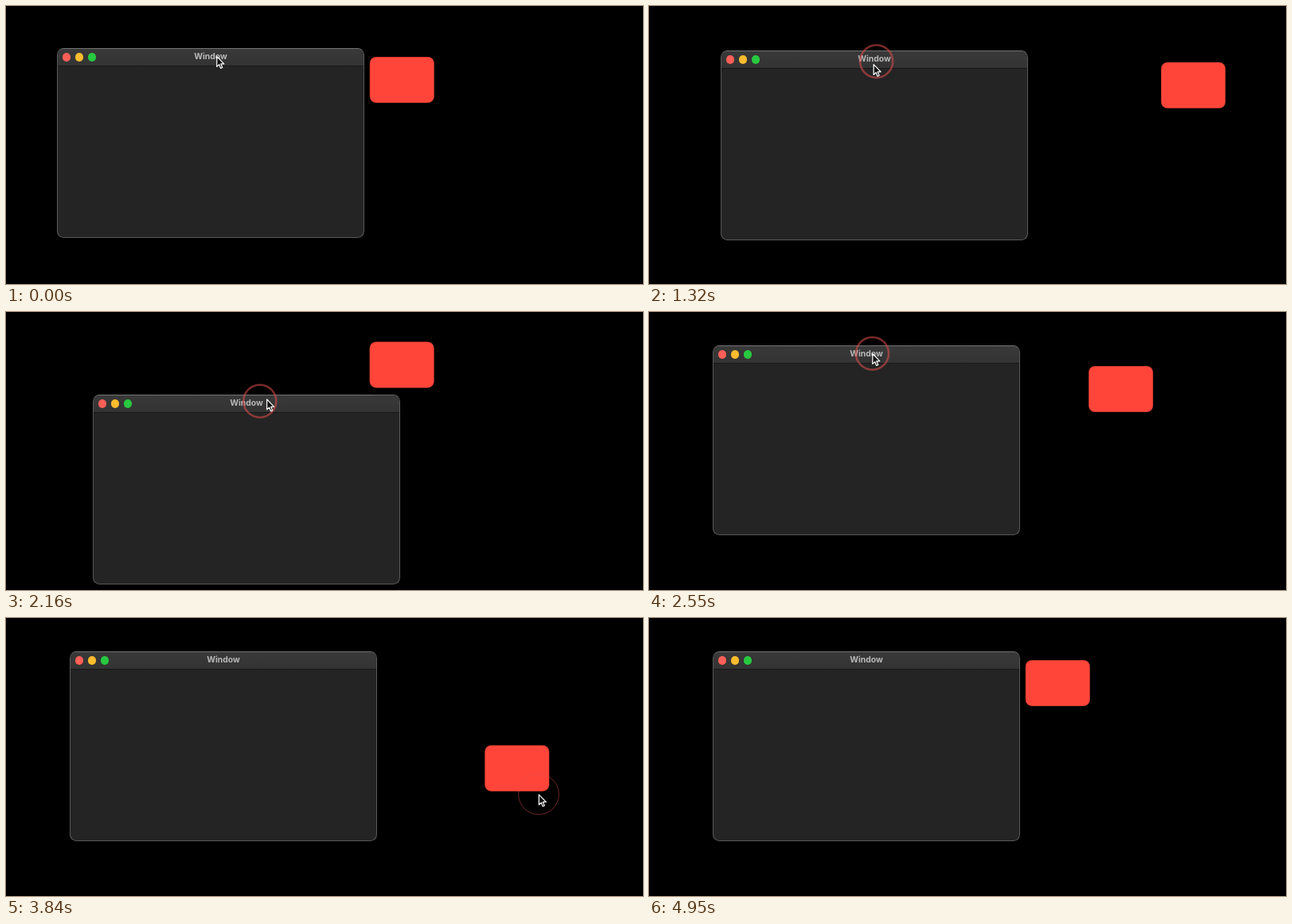
Recreate the animation shown at these times as an HTML page. Size 800 px wide and 350 px high, loop 5.04 s.

```html
<!DOCTYPE html>
<html lang="en">
<head>
<meta charset="utf-8">
<title>Attached panel</title>
<style>
  html, body { margin: 0; width: 100%; height: 100%; overflow: hidden; background: #000; }
  #stage { position: relative; width: 800px; height: 350px; overflow: hidden; background: #000; }
  #stage > * { position: absolute; left: 0; top: 0; }
  #win {
    box-sizing: border-box; width: 386px; height: 239px; overflow: hidden;
    border: 1px solid #585858; border-top-color: #727272; border-radius: 8.5px; background: #242424;
  }
  #bar {
    height: 21px; border-bottom: 1px solid #181818;
    background: linear-gradient(#393939, #333);
    font: 700 10.4px/20.5px Inter, "Open Sans", sans-serif; color: #b8b8b8; text-align: center;
  }
  #bar i { position: absolute; top: 5.2px; width: 10.6px; height: 10.6px; border-radius: 50%; }
  #panel {
    width: 80.5px; height: 58px; border-radius: 8px; background: #ff453a;
    box-shadow: inset 0 0 0 .5px rgba(0, 0, 0, .35), 0 5px 10px rgba(0, 0, 0, .45);
  }
  svg { overflow: visible; }
</style>
</head>
<body>
<div id="stage">
  <div id="win">
    <div id="bar">
      <i style="left:5.6px;background:#ff5f57"></i>
      <i style="left:21.6px;background:#febc2e"></i>
      <i style="left:37.6px;background:#28c840"></i>
      Window
    </div>
  </div>
  <div id="panel"></div>
  <svg width="800" height="350">
    <circle id="ring" fill="none" stroke="rgb(235,80,80)" stroke-opacity=".52"/>
    <path id="arrow" d="M.3 .3V13.2L3.2 10.5L5.2 15.2L7.3 14.3L5.3 9.7H9.3Z"
      fill="#111" stroke="#fff" stroke-width="1.2" stroke-linejoin="round"/>
  </svg>
</div>
<script>
const LOOP = 5040, STEP = 30, LAST = 4950;
const LEAD = 30;        // the pointer runs ahead of what it drags
const DELAY = 227;      // the panel follows the window later
const GRIP = [200, 9.7], DOCK = [392.3, 10.4], HOLD = [34.5, 34];
const DROP = [669, 222];
const LET_GO = 3770;

// Turning points [time, position] of the window's swings, per axis
const swingX = [[645, 64.5], [1017, 271], [1378, 79], [1660, 209], [2004, 48], [2300, 162], [2520, 80.5]];
const swingY = [[645, 53.5], [892, 112], [1198, 42], [1566, 101], [1875, 17], [2140, 105], [2412, 42.5]];

const $ = id => document.getElementById(id);
const add = (a, b, k = 1) => [a[0] + k * b[0], a[1] + k * b[1]];
const mix = (a, b, u) => add(a, add(b, a, -1), u);
const ramp = (t, from, to) => Math.min(1, Math.max(0, (t - from) / (to - from)));
const ease = (t, from, to) => (1 - Math.cos(Math.PI * ramp(t, from, to))) / 2;

const swing = (turns, t) => turns.reduce((sum, [time, pos], i) => {
  if (!i) return pos;
  const [before, last] = turns[i - 1];
  return sum + (pos - last) * ease(t, before, time);
}, 0);

const windowAt = t => [swing(swingX, t), swing(swingY, t)];
const home = add(windowAt(LOOP), DOCK);

function pointerAt(t) {
  const onBar = add(windowAt(t + LEAD), GRIP);
  const onPanel = mix(onBar, add(home, HOLD), ease(t, 2900, 3200));
  const dragged = mix(onPanel, DROP, ease(t, 3330, 3700));
  const exit = ease(t, 4350, 4860);
  return add(dragged, [-120 * exit, 44 * exit + 80 * Math.sin(Math.PI * exit)]);
}

function panelAt(t) {
  if (t < 3330) return add(windowAt(t - DELAY), DOCK);
  const held = add(pointerAt(Math.min(t, LET_GO) - LEAD), HOLD, -1);
  const w = 0.012 * Math.max(0, t - LET_GO);
  return mix(home, held, (1 + w) * Math.exp(-w));
}

function ringAt(t) {
  const [down, up] = t < 3000 ? [470, 2700] : [3300, 3755];
  const grow = ramp(t, down, down + 90), fade = ramp(t, up, up + 130);
  return { r: 14 + 6.5 * grow + 7.5 * fade, width: 2.6 * grow * (1 - fade) };
}

const place = (el, [x, y]) => el.style.transform = `translate(${x}px, ${y}px)`;

function draw(t) {
  place($("win"), windowAt(t).map(v => Math.round(v - 0.5)));
  place($("panel"), panelAt(t));
  const { r, width } = ringAt(t), [x, y] = pointerAt(t - LEAD / 2);
  const ring = $("ring");
  ring.setAttribute("cx", x);
  ring.setAttribute("cy", y);
  ring.setAttribute("r", r);
  ring.setAttribute("stroke-width", width);
  place($("arrow"), pointerAt(t));
  $("arrow").style.visibility = t < 4890 ? "visible" : "hidden";
}

const start = performance.now();
function tick() {
  const t = (performance.now() - start) % LOOP;
  draw(Math.min(LAST, Math.floor(t / STEP) * STEP));
  requestAnimationFrame(tick);
}
tick();
</script>
</body>
</html>
```
